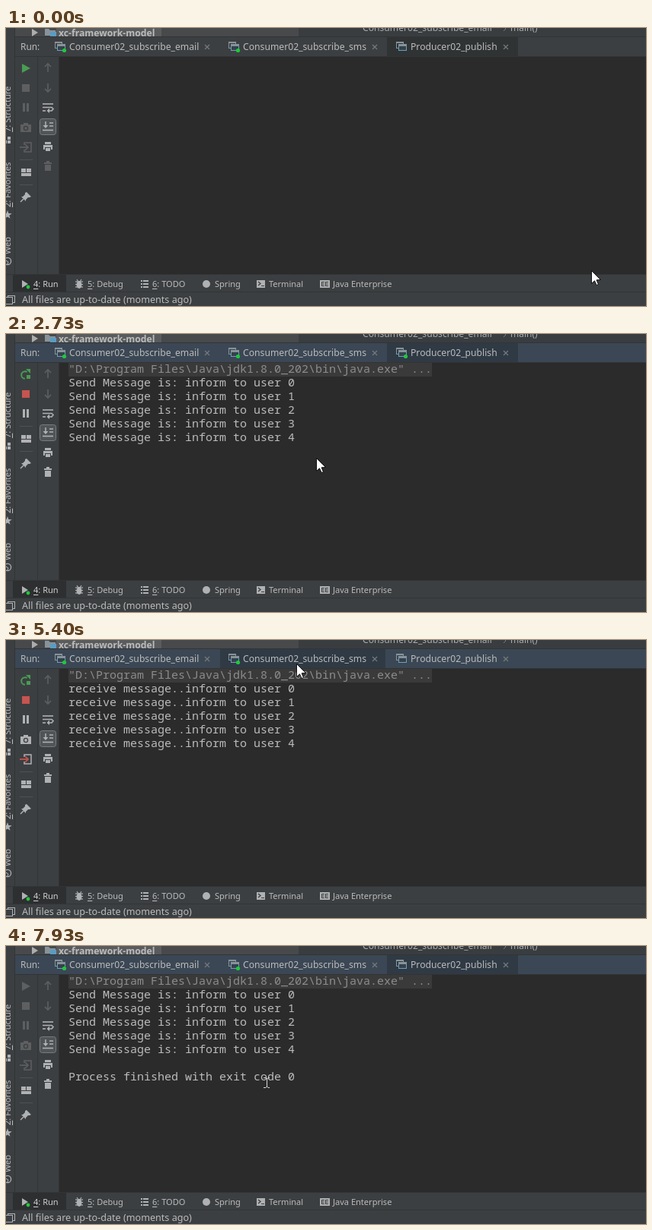
These frames come from a looping animation (840x366 px, 8 s). An HTML page with a canvas:

```html
<!DOCTYPE html>
<html lang="en">
<head>
<meta charset="utf-8">
<title>Run window</title>
<style>
html, body { margin: 0; width: 100%; height: 100%; overflow: hidden; background: #3c3f41; }
canvas { display: block; width: 840px; height: 366px; }
</style>
</head>
<body>
<canvas id="stage" width="840" height="366"></canvas>
<script>
const c = document.getElementById('stage').getContext('2d', { alpha: false });
const LOOP = 8000;
const UI = '"Noto Sans", "Open Sans", sans-serif';
const MONO = '"Noto Sans Mono", "DejaVu Sans Mono", monospace';
const PANEL = '#3c3f41', EDGE = '#323435', TEXT = '#bbbbbb', ICON = '#afb1b3', OFF = '#5d5f61';
const GREEN = '#499c54', RED = '#c75450';

// Mouse stops: time, x, y
const path = [
  [40, 768, 319], [600, 48, 48], [770, 48, 48], [870, 27, 48],
  [1630, 27, 48], [2110, 407, 163], [3430, 407, 163], [3550, 396, 178],
  [3900, 190, 27], [4130, 190, 27], [4330, 264, 31], [4720, 350, 30],
  [5300, 350, 30], [5600, 470, 33], [5930, 562, 28], [6400, 562, 28],
  [7180, 27, 47], [7300, 27, 47], [7900, 342, 180]
];

const tabs = [
  { name: 'Consumer02_subscribe_email', x: 53, end: 278, icon: 64, close: 264 },
  { name: 'Consumer02_subscribe_sms', x: 281, end: 498, icon: 292, close: 484 },
  { name: 'Producer02_publish', x: 500, end: 672, icon: 512, close: 656 }
];

function box(x, y, w, h, color) {
  c.fillStyle = color;
  c.fillRect(x, y, w, h);
}

function frame(x, y, w, h, color) {
  c.strokeStyle = color;
  c.lineWidth = 1;
  c.strokeRect(x + .5, y + .5, w - 1, h - 1);
}

function shape(color, ...pts) {
  c.fillStyle = color;
  c.beginPath();
  for (let i = 0; i < pts.length; i += 2) c.lineTo(pts[i], pts[i + 1]);
  c.closePath();
  c.fill();
}

function line(color, width, ...pts) {
  c.strokeStyle = color;
  c.lineWidth = width;
  c.beginPath();
  for (let i = 0; i < pts.length; i += 2) c.lineTo(pts[i], pts[i + 1]);
  c.stroke();
}

function dot(x, y, r, color) {
  c.fillStyle = color;
  c.beginPath();
  c.arc(x, y, r, 0, 7);
  c.fill();
}

function text(s, x, y, size, color = TEXT, font = UI, weight = 400) {
  c.font = `${weight} ${size}px ${font}`;
  c.fillStyle = color;
  c.fillText(s, x, y);
}

// Label with its first character underlined
function mnemonic(s, x, y, color = TEXT) {
  text(s, x, y, 11.05, color);
  box(x, y + 2, c.measureText(s[0]).width, 1, color);
}

function mouseAt(t) {
  let i = 0;
  while (i < path.length - 1 && path[i + 1][0] <= t) i++;
  const a = path[i], b = path[i + 1] || a;
  const k = b === a ? 0 : Math.max(0, (t - a[0]) / (b[0] - a[0]));
  const e = k * k * (3 - 2 * k);
  return { x: a[1] + (b[1] - a[1]) * e, y: a[2] + (b[2] - a[2]) * e };
}

function stateAt(t) {
  const mouse = mouseAt(t);
  const tab = t < 3930 ? 2 : t < 4800 ? 0 : t < 6400 ? 1 : 2;
  const consumer = tab < 2;
  const sending = t >= 2130 && t < 2930;
  const over = (x, y, w, h) => mouse.x >= x && mouse.x < x + w && mouse.y >= y && mouse.y < y + h;
  return {
    t, mouse, tab, consumer, sending, over,
    focus: t >= 1530,
    alive: consumer || sending,
    compact: !consumer && sending,
    pausable: consumer || (t >= 2130 && t < 3130),
    building: (t >= 1670 && t < 2130) || t >= 7400,
    filled: t >= 2130
  };
}

function topEdge() {
  box(0, 0, 840, 366, PANEL);
  box(12, 0, 372, 11, '#47494b');
  box(66, 0, 138, 11, '#595b5d');
  shape('#adadad', 34, 1, 42, 6, 34, 11);
  shape('#87939a', 51, 1, 56, 1, 58, 3, 65, 3, 65, 10, 51, 10);
  box(58, 5, 8, 6, '#5b9bc4');
  text('xc-framework-model', 69, 10.5, 12.2, TEXT, UI, 700);
  box(384, 0, 456, 11, '#3a3d3f');
  text('Consumer02_subscribe_email', 468, 4, 12.15, '#a9abad');
  line('#77797b', 1, 653, -2, 656, 1, 653, 4);
  text('main()', 662, 4, 12, '#a9abad');
  box(0, 11, 840, 1, EDGE);
}

function leftStripe() {
  box(0, 0, 11, 325, PANEL);
  box(11, 0, 1, 325, EDGE);
  [['7: Structure', 137], ['2: Favorites', 236], ['Web', 298]].forEach(([s, y], i) => {
    c.save();
    c.translate(6, y);
    c.rotate(-Math.PI / 2);
    if (i < 2) mnemonic(s, 0, 0);
    else text(s, 0, 0, 11.05);
    c.restore();
  });
  box(2, 143, 4, 4, ICON);
  box(-3, 148, 4, 4, ICON);
  box(2, 148, 4, 4, ICON);
  const star = [];
  for (let i = 0; i < 10; i++) {
    const r = i % 2 ? 2.4 : 6, a = i * Math.PI / 5 - Math.PI / 2;
    star.push(2 + r * Math.cos(a), 246 + r * Math.sin(a));
  }
  shape(ICON, ...star);
  c.strokeStyle = ICON;
  c.lineWidth = 1.3;
  c.beginPath();
  c.arc(2, 307, 4.6, 0, 7);
  c.stroke();
  line(ICON, 1, -2, 305, 3, 308, 2, 311);
}

function tabBar(s) {
  box(12, 12, 828, 25, s.focus ? '#3b4754' : PANEL);
  box(12, 37, 828, 1, EDGE);
  text('Run:', 19, 29, 11.9);
  tabs.forEach((tab, i) => {
    const w = tab.end - tab.x;
    if (i === s.tab) box(tab.x, 12, w, 25, s.focus ? '#2f3a45' : '#303334');
    else if (s.over(tab.x, 12, w, 25)) box(tab.x, 12, w, 25, s.focus ? '#323e4a' : '#35383a');
    const x = tab.icon;
    frame(x, 18, 10, 9, '#87939a');
    box(x, 18, 10, 2, '#87939a');
    box(x + 3, 21, 11, 9, '#33424c');
    frame(x + 3, 21, 11, 9, '#6f9fb8');
    box(x + 3, 21, 11, 3, '#87939a');
    if (i < 2 || s.sending) dot(x + 12.5, 29.5, 2.6, '#20c83c');
    text(tab.name, x + 19, 29, 12.18);
    const k = tab.close;
    line('#74787b', 1.2, k - 3, 22, k + 3, 28);
    line('#74787b', 1.2, k + 3, 22, k - 3, 28);
  });
}

function runIcon(s) {
  if (s.over(15, 42, 22, 22)) box(15, 42, 22, 22, '#4c5052');
  if (!s.alive) {
    shape(s.building ? OFF : GREEN, 21, 47, 32, 53, 21, 59);
    return;
  }
  c.strokeStyle = GREEN;
  c.lineWidth = 2;
  c.beginPath();
  c.arc(25, 54, 4.8, 1.6, 5.3);
  c.stroke();
  shape(GREEN, 26, 46, 32, 46, 32, 52);
  box(27, 54, 5, 5, GREEN);
}

function leftTools(s) {
  box(12, 38, 29, 287, PANEL);
  box(41, 38, 1, 287, EDGE);
  runIcon(s);
  box(21, 74, 10, 10, s.alive ? RED : OFF);
  const pause = s.pausable ? ICON : OFF;
  box(22, 99, 3, 11, pause);
  box(27, 99, 3, 11, pause);
  const up = s.compact ? 52 : 0;
  if (!up) {
    const col = s.alive ? ICON : OFF;
    box(19, 127, 14, 10, col);
    box(23, 125, 6, 3, col);
    dot(26, 132, 3.2, PANEL);
    dot(26, 132, 1.9, col);
    line(col, 1.5, 24, 154, 24, 151, 33, 151, 33, 163, 24, 163, 24, 160);
    const out = s.alive ? RED : OFF;
    line(out, 1.7, 18, 157, 28, 157);
    line(out, 1.7, 25, 153, 29, 157, 25, 161);
  }
  box(18, 173 - up, 17, 1, '#4f5254');
  box(20, 185 - up, 6, 5, ICON);
  box(27, 185 - up, 6, 5, ICON);
  box(20, 191 - up, 13, 4, ICON);
  box(18, 206 - up, 17, 1, '#4f5254');
  const y = 222 - up;
  shape(ICON, 27, y - 6, 33, y, 31, y + 1, 29, y + 1, 26, y + 4, 26, y + 6, 20, y, 22, y, 25, y - 3, 25, y - 5);
  line(ICON, 1.4, 23, y + 3, 19, y + 7);
}

function rightTools(s) {
  box(42, 38, 27, 287, PANEL);
  box(69, 38, 1, 287, EDGE);
  line(OFF, 1.6, 55, 58, 55, 47);
  line(OFF, 1.6, 51, 51, 55, 47, 59, 51);
  line(OFF, 1.6, 55, 73, 55, 84);
  line(OFF, 1.6, 51, 80, 55, 84, 59, 80);

  line(ICON, 1.6, 48, 100, 62, 100);
  line(ICON, 1.6, 48, 104.5, 60, 104.5, 62, 106.5, 60, 109, 56, 109);
  line(ICON, 1.6, 48, 109, 52, 109);
  shape(ICON, 57, 105.5, 57, 112, 53.5, 109);

  c.beginPath();
  c.roundRect(44.5, 119.5, 21, 21, 3);
  c.fillStyle = '#505457';
  c.fill();
  c.strokeStyle = '#787b7e';
  c.lineWidth = 1;
  c.stroke();
  line(ICON, 1.5, 57, 125, 62, 125);
  line(ICON, 1.5, 57, 129, 62, 129);
  line(ICON, 1.6, 48, 134.5, 62, 134.5);
  line(ICON, 1.5, 52, 123, 52, 130);
  shape(ICON, 48.5, 128, 55.5, 128, 52, 132);

  box(51, 150, 8, 3, ICON);
  box(49, 154, 12, 6, ICON);
  box(51, 157, 8, 5, PANEL);
  box(52, 158, 6, 4, ICON);

  const bin = s.filled ? ICON : OFF;
  box(50, 177, 10, 2, bin);
  box(53, 175, 4, 2, bin);
  box(51, 180, 8, 8, bin);
}

function consoleText(s) {
  box(70, 38, 770, 286, '#2b2b2b');
  if (!s.filled) {
    if (s.t >= 1560 && s.t < 2000) box(82, 39, 2, 16, TEXT);
    return;
  }
  const row = (str, n, color = TEXT) => text(str, 82, 51 + 18 * n, 15, color, MONO);
  box(82, 38, 477, 18, '#3a3a3a');
  row('"D:\\Program Files\\Java\\jdk1.8.0_202\\bin\\java.exe" ...', 0, '#8c8c8c');
  if (s.t < 2730) return;
  const lead = s.consumer ? 'receive message..' : 'Send Message is: ';
  for (let i = 0; i < 5; i++) row(`${lead}inform to user ${i}`, i + 1);
  if (!s.consumer && s.t >= 3130) row('Process finished with exit code 0', 7);
}

function bottomBars(s) {
  box(0, 324, 840, 24, PANEL);
  box(0, 324, 840, 1, EDGE);
  box(9, 325, 70, 22, '#2d2f30');
  box(0, 347, 840, 1, EDGE);

  shape(ICON, 21, 332, 29, 337, 21, 342);
  dot(29, 341, 2.4, '#20c83c');
  mnemonic('4: Run', 36, 341, '#d0d0d0');

  c.fillStyle = ICON;
  c.beginPath();
  c.ellipse(96, 338, 3.4, 5, 0, 0, 7);
  c.fill();
  for (const y of [334, 337.5, 341]) line(ICON, 1.2, 91, y, 101, y);
  line(ICON, 1.2, 93, 331, 95, 334, 97, 334, 99, 331);
  mnemonic('5: Debug', 107, 341);

  for (const y of [332, 336, 340]) {
    box(177, y, 2, 2, ICON);
    box(180, y, 7, 2, ICON);
  }
  mnemonic('6: TODO', 192, 341);

  dot(263, 337, 5, ICON);
  text('Spring', 274, 341, 11.05);

  box(329, 332, 11, 10, ICON);
  line(PANEL, 1.3, 331, 334, 334, 336.5, 331, 339);
  box(335, 339, 4, 1, PANEL);
  text('Terminal', 345, 341, 11);

  box(412, 332, 13, 10, ICON);
  for (const x of [414, 419]) {
    box(x, 334, 1, 6, PANEL);
    for (const y of [334, 336.5, 339]) box(x, y, 4, 1, PANEL);
  }
  text('Java Enterprise', 429, 341, 11.05);

  frame(2, 352, 10, 10, ICON);
  box(0, 354, 9, 10, PANEL);
  frame(-1, 354, 10, 10, ICON);
  if (s.over(44, 42, 22, 22)) text('Navigate to the previous occurrence', 21, 362, 12.45);
  else text('All files are up-to-date (moments ago)', 21, 362, 12.6);
}

function tooltip(t) {
  const alpha = t < 1200 ? 0 : t < 1270 ? .33 : t < 1330 ? .66 : t < 1530 ? 1 : t < 1600 ? .75 : t < 1670 ? .5 : t < 1730 ? .25 : 0;
  if (!alpha) return;
  c.globalAlpha = alpha;
  c.beginPath();
  c.roundRect(7.5, 16.5, 223, 24, 3);
  c.fillStyle = '#383c3f';
  c.fill();
  c.strokeStyle = '#55595c';
  c.lineWidth = 1;
  c.stroke();
  text("Rerun 'Producer02_publish' (Ctrl+F5)", 13, 33, 12.4);
  c.globalAlpha = 1;
}

function pointer(s) {
  const { x, y } = s.mouse;
  c.save();
  c.translate(Math.round(x), Math.round(y));
  if (s.t > 3430 && x > 70 && y > 38) {
    line('#d8d8d8', 1, -4, -6.5, -1, -6.5, .5, -5, 2, -6.5, 4, -6.5);
    line('#d8d8d8', 1, .5, -6, .5, 6);
    line('#d8d8d8', 1, -4, 6.5, -1, 6.5, .5, 5, 2, 6.5, 4, 6.5);
  } else {
    c.beginPath();
    for (const [px, py] of [[0, 0], [0, 17], [4, 13.3], [6.6, 19], [9, 18], [6.6, 12.3], [12, 12]]) c.lineTo(px + .5, py + .5);
    c.closePath();
    c.fillStyle = '#fff';
    c.fill();
    c.strokeStyle = '#111';
    c.lineWidth = 1;
    c.stroke();
  }
  c.restore();
}

function draw(now) {
  const s = stateAt(now % LOOP);
  topEdge();
  tabBar(s);
  leftTools(s);
  rightTools(s);
  consoleText(s);
  leftStripe();
  bottomBars(s);
  tooltip(s.t);
  pointer(s);
}

let start;
function tick(now) {
  start ??= now;
  draw(now - start);
  requestAnimationFrame(tick);
}
draw(0);
requestAnimationFrame(tick);
</script>
</body>
</html>
```
